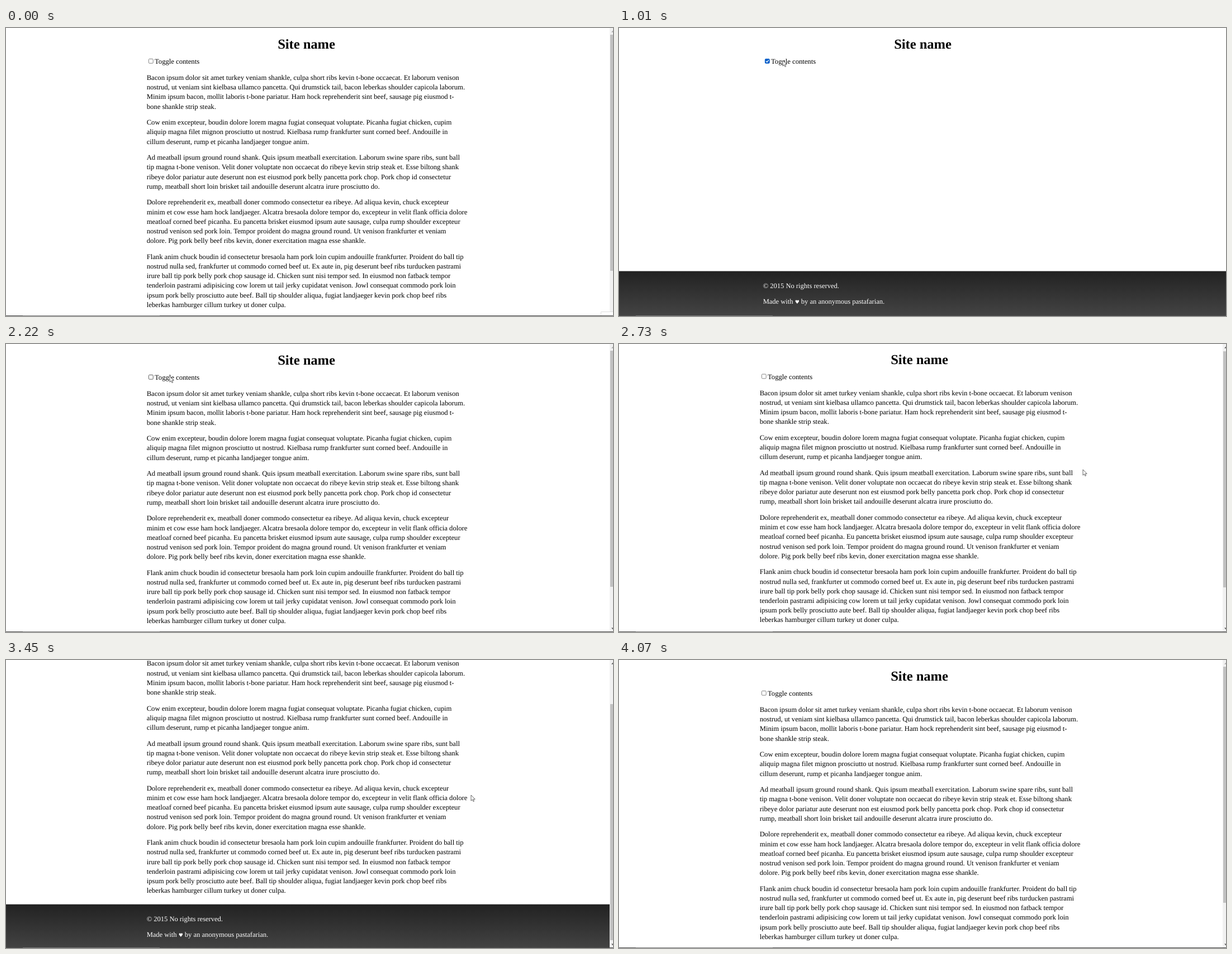
Recreate the animation shown at these times as an HTML page. Size 1086 by 516 pixels, loop 4.77 s.

```html
<!DOCTYPE html>
<html lang="en">
<head>
<meta charset="utf-8">
<title>Toggle contents</title>
<style>
  html, body { margin: 0; width: 100%; height: 100%; overflow: hidden; background: #fff; }
  svg { display: block; width: 1086px; height: 516px; }
  text { font: 12.63px "Liberation Serif", serif; text-rendering: geometricPrecision; white-space: pre; fill: #000; }
  .title { font-size: 24.5px; font-weight: bold; text-anchor: middle; }
  #footer text { font-size: 12.5px; fill: #fff; }
  .heart { font: 9px "DejaVu Sans", sans-serif; }
</style>
</head>
<body>
<svg viewBox="0 0 1086 516">
  <defs>
    <linearGradient id="shade" x2="0" y2="1">
      <stop stop-color="#222"/><stop offset="1" stop-color="#444"/>
    </linearGradient>
  </defs>
  <g id="page">
    <text class="title" x="537.5" y="37.3">Site name</text>
    <rect id="box" x="255.4" y="55.4" width="7.8" height="7.8" rx="1.3" stroke-width=".9"/>
    <path id="tick" d="M257 59.3l1.8 1.9 3-3.8" fill="none" stroke="#fff" stroke-width="1.3"/>
    <text x="266" y="64.3">Toggle contents</text>
    <g id="content"></g>
  </g>
  <g id="footer">
    <rect width="1086" height="81" fill="url(#shade)"/>
    <g id="notes">
      <text x="251.7" y="30">© 2015 No rights reserved.</text>
      <text x="251.7" y="58.7">Made with <tspan class="heart">♥</tspan> by an anonymous pastafarian.</text>
    </g>
  </g>
  <g id="scrollbar">
    <path d="M1080 0h6v516h-6z" fill="#f1f1f1"/>
    <rect id="thumb" x="1081" width="5" height="423" fill="#c1c1c1"/>
    <path id="up" d="M1086 4.5l-3 3h3z"/>
    <path id="down" d="M1086 511.5l-3-3h3z"/>
  </g>
  <path id="hint" d="M1064.5 517v-8.5h22v8.5z" fill="#fff" stroke="#ddd"/>
  <path d="M0 515.5h1086" stroke="#4a4a4a"/>
  <path d="M30 515.5h245" stroke="#777"/>
  <circle id="glow" cx="293" cy="60" r="9.2" fill="#f8ee1c" opacity=".75"/>
  <path id="cursor" d="M0 0v10.2l2.4-2.2 1.6 3.6 1.6-.8-1.5-3.4h3.1z" fill="#fff" stroke="#333" stroke-width=".75"/>
</svg>
<script>
const LOOP = 4770, STEP = 100, LINE = 17.2, PARAGRAPH_GAP = 11.4, MAX_SCROLL = 84;

const paragraphs = [
`Bacon ipsum dolor sit amet turkey veniam shankle, culpa short ribs kevin t-bone occaecat. Et laborum venison
nostrud, ut veniam sint kielbasa ullamco pancetta. Qui drumstick tail, bacon leberkas shoulder capicola laborum.
Minim ipsum bacon, mollit laboris t-bone pariatur. Ham hock reprehenderit sint beef, sausage pig eiusmod t-
bone shankle strip steak.`,
`Cow enim excepteur, boudin dolore lorem magna fugiat consequat voluptate. Picanha fugiat chicken, cupim
aliquip magna filet mignon prosciutto ut nostrud. Kielbasa rump frankfurter sunt corned beef. Andouille in
cillum deserunt, rump et picanha landjaeger tongue anim.`,
`Ad meatball ipsum ground round shank. Quis ipsum meatball exercitation. Laborum swine spare ribs, sunt ball
tip magna t-bone venison. Velit doner voluptate non occaecat do ribeye kevin strip steak et. Esse biltong shank
ribeye dolor pariatur aute deserunt non est eiusmod pork belly pancetta pork chop. Pork chop id consectetur
rump, meatball short loin brisket tail andouille deserunt alcatra irure prosciutto do.`,
`Dolore reprehenderit ex, meatball doner commodo consectetur ea ribeye. Ad aliqua kevin, chuck excepteur
minim et cow esse ham hock landjaeger. Alcatra bresaola dolore tempor do, excepteur in velit flank officia dolore
meatloaf corned beef picanha. Eu pancetta brisket eiusmod ipsum aute sausage, culpa rump shoulder excepteur
nostrud venison sed pork loin. Tempor proident do magna ground round. Ut venison frankfurter et veniam
dolore. Pig pork belly beef ribs kevin, doner exercitation magna esse shankle.`,
`Flank anim chuck boudin id consectetur bresaola ham pork loin cupim andouille frankfurter. Proident do ball tip
nostrud nulla sed, frankfurter ut commodo corned beef ut. Ex aute in, pig deserunt beef ribs turducken pastrami
irure ball tip pork belly pork chop sausage id. Chicken sunt nisi tempor sed. In eiusmod non fatback tempor
tenderloin pastrami adipisicing cow lorem ut tail jerky cupidatat venison. Jowl consequat commodo pork loin
ipsum pork belly prosciutto aute beef. Ball tip shoulder aliqua, fugiat landjaeger kevin pork chop beef ribs
leberkas hamburger cillum turkey ut doner culpa.`];

const entry = { x: 940, y: 430 };
const label = { x: 293, y: 58 };
const moves = [
  { start: 100, steps: 7, to: label },
  { start: 1330, steps: 2, to: { x: 300, y: 118 } },
  { start: 1630, steps: 6, to: label },
  { start: 2430, steps: 4, to: { x: 830, y: 225 } },
  { start: 2830, steps: 4, to: { x: 832, y: 242 } },
  { start: 3860, steps: 2, to: { x: 863, y: 278 } }
];

const $ = id => document.getElementById(id);
const within = (t, from, to) => t >= from && t < to;
const show = (id, on) => $(id).setAttribute('visibility', on ? 'visible' : 'hidden');
const place = (id, x, y) => $(id).setAttribute('transform', `translate(${x} ${y})`);
const fill = (id, color) => $(id).setAttribute('fill', color);
const clamp = p => Math.min(1, Math.max(0, p));
const easeOut = p => 1 - (1 - p) ** 2;
const smooth = p => p * p * (3 - 2 * p);
const stepsSince = (t, start) => Math.floor((t - start) / STEP);

function cursorAt(t) {
  let { x, y } = entry;
  for (const { start, steps, to } of moves) {
    const p = easeOut(clamp((stepsSince(t, start) + 1) / steps));
    x += (to.x - x) * p;
    y += (to.y - y) * p;
  }
  return { x, y };
}

// A wheel turn barely moves the page in its first step and is done after two more
const wheel = (t, start) => smooth(clamp((stepsSince(t, start) + 0.15) / 2));
const scrollAt = t => MAX_SCROLL * (wheel(t, 2730) - wheel(t, 3450));

let baseline = 93;
for (const paragraph of paragraphs) {
  for (const line of paragraph.split('\n')) {
    const text = document.createElementNS($('page').namespaceURI, 'text');
    text.setAttribute('x', 251.7);
    text.setAttribute('y', baseline);
    text.textContent = line;
    $('content').append(text);
    baseline += LINE;
  }
  baseline += PARAGRAPH_GAP;
}

function draw(t) {
  const collapsed = within(t, 1010, 2220);
  const shift = collapsed ? 6 : 0;
  const scroll = scrollAt(t);
  const { x, y } = cursorAt(t);
  const hover = x < 352 && y < 68;

  place('page', shift, -scroll);
  place('footer', 0, collapsed ? 435.6 : 520.4 - scroll);
  place('notes', shift, 0);
  show('content', !collapsed);
  show('scrollbar', !collapsed);
  show('tick', collapsed);

  const blue = hover ? '#005cc8' : '#0075ff';
  fill('box', collapsed ? blue : '#fff');
  $('box').setAttribute('stroke', collapsed ? blue : hover ? '#4f4f4f' : '#767676');

  $('thumb').setAttribute('y', 12 + scroll * 0.81);
  fill('up', scroll > 0 ? '#505050' : '#a3a3a3');
  fill('down', scroll < MAX_SCROLL ? '#505050' : '#a3a3a3');

  show('hint', t < 100);
  show('glow', within(t, 910, 1010) || within(t, 2130, 2220));
  show('cursor', within(t, 100, 4070));
  place('cursor', x, y);
}

const begin = performance.now();
function frame() {
  draw((performance.now() - begin) % LOOP);
  requestAnimationFrame(frame);
}
frame();
</script>
</body>
</html>
```
